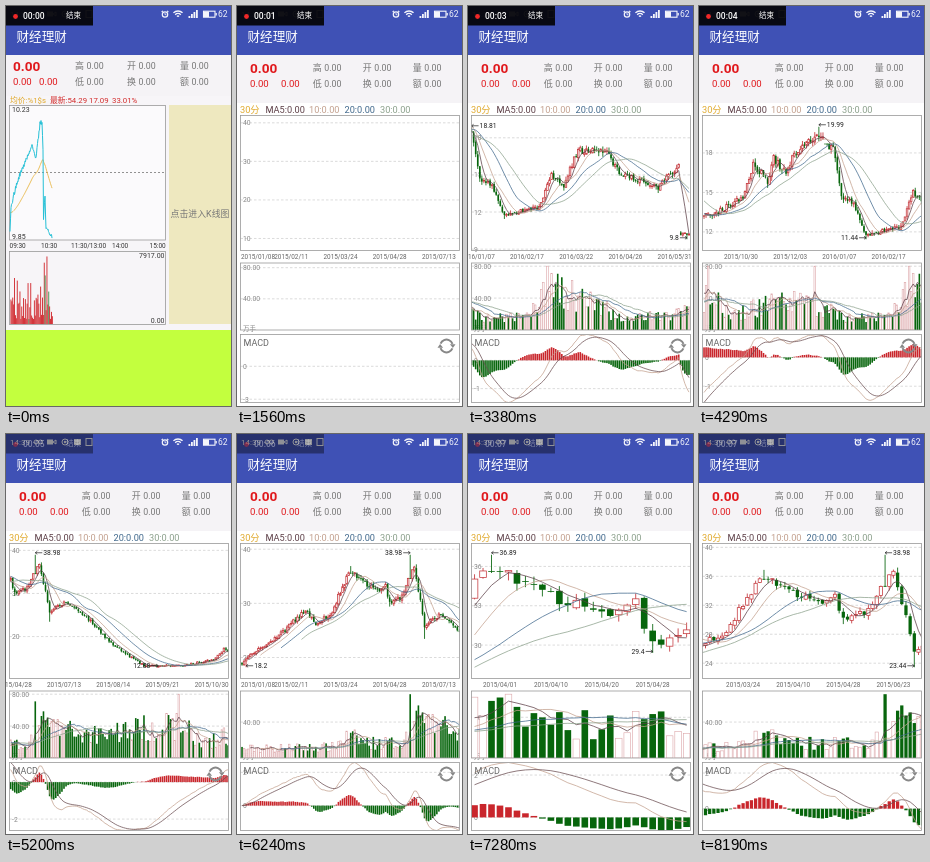
Write an HTML page with a canvas that moves like this. It is 225 px wide and 400 px high and loops after 8.32 s.

```html
<!DOCTYPE html>
<html lang="zh">
<head>
<meta charset="utf-8">
<title>K线</title>
<style>
html, body { margin: 0; width: 100%; height: 100%; overflow: hidden; background: #fff; }
canvas { display: block; width: 225px; height: 400px; }
</style>
</head>
<body>
<canvas id="stage"></canvas>
<script>
const LOOP = 8320, TICK = 130, N = 320;
const canvas = document.getElementById('stage'), c = canvas.getContext('2d');
const dpr = window.devicePixelRatio || 1;
canvas.width = 225 * dpr;
canvas.height = 400 * dpr;

const RED = '#c4363b', GREEN = '#07650c', GRAY = '#888', AMBER = '#e0a92c';
const MA_DAYS = [5, 10, 20, 30], MA_COLORS = ['#5d3f47', '#c3a08e', '#40688c', '#8ba08b'];

let seed = 7;
const rnd = () => (seed = (seed * 16807) % 2147483647) / 2147483647;

// Linear interpolation through [x, value, value...] rows
function along(keys, x, col = 1) {
  let k = 0;
  while (k < keys.length - 2 && x > keys[k + 1][0]) k++;
  const a = keys[k], b = keys[k + 1];
  const p = Math.min(1, Math.max(0, (x - a[0]) / (b[0] - a[0])));
  return a[col] + (b[col] - a[col]) * p;
}
const pairs = text => text.split(' ').map(s => s.split(':').map(Number));

// ---- data: a few turning points plus seeded noise ----
const turns = pairs('0:19 8:21.5 17:23.7 31:28.7 36:26 44:28.5 50:34 53:35.7 60:33.7 67:32 70:33.4 72:30 75:30.3 79:32 ' +
  '84:37.2 89:25.8 97:28 106:25 120:18 135:13.2 153:13.2 169:14.6 174:17.2 181:15.9 184:17.6 190:16.4 194:18 ' +
  '205:19.4 213:18.3 217:14.8 223:14 229:11.8 246:12.4 252:15 258:14.2 265:17 279:16.8 285:15.2 304:14 314:15.7 315:10.2');
const volumes = pairs('0:11 44:13 52:26 62:18 78:18 86:46 104:32 152:44 165:22 186:40 206:32 220:17 240:16 251:58 272:35 290:14 319:24');
const spikes = [82, 152, 204, 250];

const days = [];
let prev = 18.9;
for (let i = 0; i < N; i++) {
  const base = along(turns, i), jitter = k => (rnd() - 0.5) * k * base;
  const close = base + jitter(0.032), open = prev + jitter(0.012);
  days.push({
    open, close, up: close >= open,
    high: Math.max(open, close) + Math.abs(jitter(0.04)),
    low: Math.min(open, close) - Math.abs(jitter(0.04)),
    vol: spikes.includes(i) ? 80 - (i == 82) * 9 : along(volumes, i) * (0.5 + rnd() * 0.85)
  });
  prev = i == 314 ? 10.4 : close;
}
// Local extremes: index, price, side; near neighbours stay inside
[[2, 18.2, -1], [53, 36.89, 1], [72, 29.4, -1], [82, 38.98, 1], [89, 23.44, -1],
 [213, 18.81, 1], [206, 19.99, 1], [229, 11.44, -1], [318, 9.8, -1]].forEach(([at, price, side]) => {
  const inside = side > 0 ? Math.min : Math.max;
  for (const d of days.slice(Math.max(0, at - 4), at + 5))
    for (const k of ['open', 'close', 'high', 'low']) d[k] = inside(d[k], price - side * 0.1);
  days[at][side > 0 ? 'high' : 'low'] = price;
});

const average = (key, n) => days.map((d, i) =>
  i < n - 1 ? null : days.slice(i - n + 1, i + 1).reduce((s, q) => s + q[key], 0) / n);
const priceMA = MA_DAYS.map(n => average('close', n));
const volMA = MA_DAYS.map(n => average('vol', n));

const dif = [], dea = [], hist = [];
let fast = days[0].close, slow = fast, signal = 0;
days.forEach((d, i) => {
  fast += (d.close - fast) * 2 / 13;
  slow += (d.close - slow) * 2 / 27;
  dif[i] = fast - slow;
  signal += (dif[i] - signal) * 0.2;
  dea[i] = signal;
  hist[i] = dif[i] - signal;
});

// Trading dates: weekdays without closed spans
const closed = ('150218-150224 150406 150501 150511-150615 150622 150708-150709 150903-150904 ' +
  '151001-151007 160101 160208-160212 160404 160502').split(' ').map(s => s.split('-'));
const dates = [];
for (let d = new Date(Date.UTC(2015, 0, 8)); dates.length < N; d.setUTCDate(d.getUTCDate() + 1)) {
  const iso = d.toISOString().slice(0, 10), day = iso.slice(2).replace(/-/g, '');
  if (d.getUTCDay() % 6 && !closed.some(([a, b = a]) => day >= a && day <= b)) dates.push(iso.replace(/-/g, '/'));
}

// ---- drawing helpers ----
function text(s, x, y, size, color, align = 'left', weight = 400) {
  c.font = `${weight} ${size}px Roboto, "Noto Sans CJK SC", "Noto Sans CJK", sans-serif`;
  c.fillStyle = color;
  c.textAlign = align;
  c.textBaseline = 'middle';
  c.fillText(s, x, y + 0.5);
}
function rect(x, y, w, h, color) {
  c.fillStyle = color;
  c.fillRect(x, y, w, h);
}
function frame(x, y, w, h, color = '#999', width = 0.8) {
  c.strokeStyle = color;
  c.lineWidth = width;
  c.strokeRect(x, y, w, h);
}
function path(points, color, width = 0.8, dash = []) {
  c.strokeStyle = color;
  c.lineWidth = width;
  c.setLineDash(dash);
  c.beginPath();
  points.forEach(([x, y]) => c.lineTo(x, y));
  c.stroke();
  c.setLineDash([]);
}
function arc(x, y, r, a, b, color, width = 1) {
  c.strokeStyle = color;
  c.lineWidth = width;
  c.beginPath();
  c.arc(x, y, r, a, b);
  c.stroke();
}
function dot(x, y, r, color) {
  c.fillStyle = color;
  c.beginPath();
  c.arc(x, y, r, 0, 7);
  c.fill();
}
function clipped(box, draw) {
  c.save();
  c.beginPath();
  c.rect(box.x, box.y, box.w, box.h);
  c.clip();
  draw();
  c.restore();
}

// ---- header ----
function header(t) {
  rect(0, 0, 225, 49, '#3f51b5');
  const w = '#f4f5fb';
  arc(159, 8.5, 2.7, 0, 7, w, 1.2);
  path([[159, 7], [159, 8.7], [160.4, 8.7]], w, 0.8);
  path([[155.6, 6], [157, 4.8]], w, 1.1);
  path([[161, 4.8], [162.4, 6]], w, 1.1);
  [1.5, 4, 6.5].forEach(r => arc(172, 11.5, r, -2.35, -0.8, w, 1.4));
  for (let i = 0; i < 4; i++) rect(182.5 + i * 2.5, 10 - i * 2, 1.8, 2 + i * 2, w);
  frame(197.5, 5.2, 11.5, 6, w, 1.1);
  rect(198, 5.5, 5, 5.5, w);
  rect(209.5, 7, 1.3, 2.5, w);
  text('62', 212, 8, 8.5, w);

  text('14:39', 4, 8, 8, w);
  [30, 34.5].forEach(x => arc(x, 8, 2, 0, 7, w));
  rect(41, 5.5, 6, 5, w);
  path([[47, 8], [50, 6], [50, 10], [47, 8]], w, 1);
  arc(59, 8, 3, 0, 7, w);
  dot(59, 8, 1.2, w);
  rect(68, 5, 7, 6, w);
  frame(80, 4.5, 6, 7, w, 1);

  const fade = along([[0, 1], [4810, 1], [5200, 0]], t);
  rect(0, 0, 87, 19.5, `rgba(6,6,10,${0.42 + fade * 0.53})`);
  c.globalAlpha = 0.4 + fade * 0.6;
  dot(9.5, 10.5, 2.4, '#f02828');
  const sec = Math.max(0, Math.floor((t - 200) / 1000));
  text('00:0' + sec, 17, 10, 8.5, '#fff', 'left', 500);
  text('结束', 60, 9.5, 7.5, '#fff', 'left', 500);
  c.globalAlpha = 1;
  text('财经理财', 10.5, 31, 12.6, '#fff', 'left', 500);
}
function quotes(x, y, cols, bottom) {
  rect(0, 49, 225, bottom - 49, '#f5f3f6');
  text('0.00', x, y, 13.6, '#e0181c', 'left', 700);
  text('0.00', x, y + 16, 9.6, '#e0181c');
  text('0.00', x + (x < 10 ? 26 : 31), y + 16, 9.6, '#e0181c');
  ['高开量', '低换额'].forEach((row, r) => [...row].forEach((s, i) => {
    text(s, cols[i], y - 0.5 + r * 16, 9, '#777');
    text('0.00', cols[i] + 11.5, y - 0.5 + r * 16, 8.8, '#777');
  }));
}

// ---- intraday page ----
const priceTurns = pairs('4:228 5:202 9:184 14:168 26:140 30:152 34:118 36:116 37:145 37.5:212 39:190 40:222 46:230');
function intraday() {
  rect(0, 49, 225, 351, '#f7f5f8');
  quotes(7, 60, [69, 121, 174], 90);
  text('均价:%1$s', 4, 94, 7.8, AMBER);
  ['最新:54.29', '17.09', '33.01%'].forEach((s, i) => text(s, [44, 83, 106][i], 94, 7.8, '#d22a2a'));
  rect(3.5, 99.5, 156, 134.5, '#fbfafc');
  frame(3.5, 99.5, 156, 134.5);
  frame(3.5, 245.5, 156, 73);
  path([[4, 166.5], [159, 166.5]], '#777', 0.8, [2, 2]);
  seed = 31;
  const price = [], mean = [];
  for (let x = 4, m = 206; x <= 46; x += 0.5) {
    const y = along(priceTurns, x) + (rnd() - 0.5) * 5;
    m += (y - m) * 0.03;
    price.push([x, y]);
    mean.push([x, m]);
  }
  path(mean, '#e8b84a', 0.9);
  path(price, '#25c0d6', 1);
  text('10.23', 6, 103, 7, '#333');
  text('9.85', 6, 230, 7, '#333');
  ['09:30', '10:30', '11:30/13:00', '14:00', '15:00']
    .forEach((s, i) => text(s, [3.5, 35, 65, 106, 143.5][i], 239.5, 6.5, '#333'));
  for (let x = 4.5; x < 46; x += 0.9) {
    const peak = x < 7 ? 60 : x > 35 && x < 42 ? 68 : 48;
    const h = 5 + peak * rnd() ** 1.7;
    rect(x, 318 - h, 0.9, h, rnd() < 0.08 ? '#3f8f4a' : '#d0242a');
  }
  text('7917.00', 158.5, 249, 7, '#333', 'right');
  text('0.00', 158.5, 314.5, 7, '#333', 'right');
  rect(163, 99, 62, 219, '#eee8bf');
  text('点击进入K线图', 194, 208, 8.9, '#777', 'center');
  rect(0, 324, 225, 76, '#c3ff3e');
}

// ---- candlestick page ----
const PRICE = { x: 3.5, y: 109.5, w: 219, h: 135 };
const VOL = { x: 3.5, y: 257, w: 219, h: 67 };
const MACD = { x: 3.5, y: 328.5, w: 219, h: 68 };
// time, first visible index, visible count
const view = [[3380, 213.7, 106.3], [4290, 150, 106.3], [6000, 0, 106.3], [6370, 0, 106.3],
  [7150, 51.2, 25.7], [7410, 51.2, 25.7], [8190, 38.9, 52.2]];

function ticks(box, y, lo, hi, step, label) {
  for (let v = Math.ceil(lo / step) * step; v <= hi; v += step) {
    path([[box.x, y(v)], [box.x + box.w, y(v)]], '#ccc', 0.7, [2.5, 2]);
    text(label(v), 6, y(v), 6.8, GRAY);
  }
}
function arrowMark(x, y, s, label) {
  path([[x, y], [x + s * 7, y]], '#222', 0.7);
  path([[x + s * 2, y - 1.5], [x, y], [x + s * 2, y + 1.5]], '#222', 0.7);
  text(label, x + s * 8, y, 6.8, '#222', s > 0 ? 'left' : 'right');
}
function refreshIcon(x, y) {
  for (const turn of [0, Math.PI]) {
    c.save();
    c.translate(x, y);
    c.rotate(turn);
    arc(0, 0, 6.4, -2.75, -0.35, GRAY, 2);
    c.fillStyle = GRAY;
    c.beginPath();
    c.moveTo(3.4, -1.8);
    c.lineTo(9, -1.8);
    c.lineTo(6.4, 2);
    c.fill();
    c.restore();
  }
}
function kline(t) {
  const empty = t < 1690;
  const left = empty ? 0 : along(view, t), count = along(view, t, 2);
  const step = 218 / count, X = i => 4 + (i + 0.5 - left) * step;
  const from = Math.max(0, Math.floor(left)), to = Math.min(N - 1, Math.ceil(left + count) - 1);
  const shown = [];
  for (let i = from; i <= to; i++) shown.push(i);
  const scale = (box, lo, hi) => v => box.y + (hi - v) / (hi - lo) * box.h;
  const curve = (data, y, color) =>
    path(shown.filter(i => data[i] !== null).map(i => [X(i), y(data[i])]), color, 0.75);
  const body = Math.max(1.5, step * 0.78);
  const bar = (i, y, h, red, line) => {
    const up = days[i].up, x = X(i) - body / 2;
    rect(x, y, body, h, up ? '#fff' : GREEN);
    if (up) frame(x, y, body, h, red, line);
  };

  rect(0, 49, 225, 351, '#fff');
  quotes(13, 62, [75.7, 125.7, 175.7], 97);
  text('30分', 3, 104, 9.2, AMBER);
  ['MA5', '10', '20', '30'].forEach((s, i) =>
    text(s + ':0.00', [28.5, 72, 107.5, 143][i], 104, 9.2, MA_COLORS[i]));

  // price
  let top = from, bottom = from, lo = 1e9, hi = 0;
  shown.forEach(i => {
    if (days[i].high > days[top].high) top = i;
    if (days[i].low < days[bottom].low) bottom = i;
    const all = [days[i].high, days[i].low, ...priceMA.map(m => m[i]).filter(v => v !== null)];
    hi = Math.max(hi, ...all);
    lo = Math.min(lo, ...all);
  });
  if (empty) [lo, hi] = [9.8, 38.98];
  const pad = (hi - lo) * 0.1;
  lo -= pad;
  hi += pad;
  const py = scale(PRICE, lo, hi);
  ticks(PRICE, py, lo, hi, hi - lo > 21 ? 10 : hi - lo > 12 ? 4 : 3, String);
  if (!empty) {
    clipped(PRICE, () => {
      shown.forEach(i => {
        const d = days[i], x = X(i);
        path([[x, py(d.high)], [x, py(d.low)]], d.up ? RED : GREEN, 0.85);
        bar(i, py(Math.max(d.open, d.close)), Math.max(0.8, Math.abs(py(d.open) - py(d.close))), RED, 0.75);
      });
      priceMA.forEach((m, k) => curve(m, py, MA_COLORS[k]));
    });
    const label = v => String(+v.toFixed(2));
    const tx = X(top), bx = X(bottom);
    arrowMark(tx, py(days[top].high) - 2, tx < 150 || step > 3 ? 1 : -1, label(days[top].high));
    arrowMark(bx, py(days[bottom].low) - 1.5, bx < 150 ? 1 : -1, label(days[bottom].low));
  }
  frame(PRICE.x, PRICE.y, PRICE.w, PRICE.h);
  const gap = Math.max(1, Math.round(count / 4.4));
  for (let i = Math.ceil((left - 1) / gap) * gap; i < N && X(i) < 215; i += gap)
    if (i >= 0) text(dates[i], i ? X(i) : Math.max(X(i), 21), 250.5, 6.4, '#666', 'center');

  // volume
  const maxVol = empty ? 86 : Math.max(...shown.map(i => days[i].vol)) * 1.05, vy = scale(VOL, 0, maxVol);
  ticks(VOL, vy, 1, maxVol, maxVol > 50 ? 40 : 20, v => v.toFixed(2));
  text('万手', 6, 323, 6.5, GRAY);
  if (!empty) clipped(VOL, () => {
    shown.forEach(i => bar(i, vy(days[i].vol), 324 - vy(days[i].vol), '#dca6a9', 0.6));
    volMA.forEach((m, k) => curve(m, vy, MA_COLORS[k]));
  });
  frame(VOL.x, VOL.y, VOL.w, VOL.h);

  // MACD
  const all = shown.flatMap(i => [dif[i], dea[i], hist[i]]);
  const mlo = empty ? -3.3 : Math.min(...all), mhi = empty ? 2.9 : Math.max(...all);
  const my = scale(MACD, mlo, mhi), range = mhi - mlo;
  ticks(MACD, my, mlo, mhi, range > 5 ? 3 : range > 3.1 ? 2 : 1, v => String(v + 0));
  if (!empty) clipped(MACD, () => {
    shown.forEach(i => rect(X(i) - body / 2, my(Math.max(0, hist[i])), body,
      Math.abs(my(0) - my(hist[i])), hist[i] > 0 ? '#c9262c' : GREEN));
    curve(dif, my, '#c3a08e');
    curve(dea, my, '#6a4c50');
  });
  frame(MACD.x, MACD.y, MACD.w, MACD.h);
  text('MACD', 6.5, 337, 9, '#666');
  refreshIcon(209.5, 340);
}

function draw(now) {
  const t = Math.floor(now % LOOP / TICK) * TICK;
  c.setTransform(dpr, 0, 0, dpr, 0, 0);
  (t < 1300 ? intraday : kline)(t);
  header(t);
  requestAnimationFrame(draw);
}
draw(0);
</script>
</body>
</html>
```
